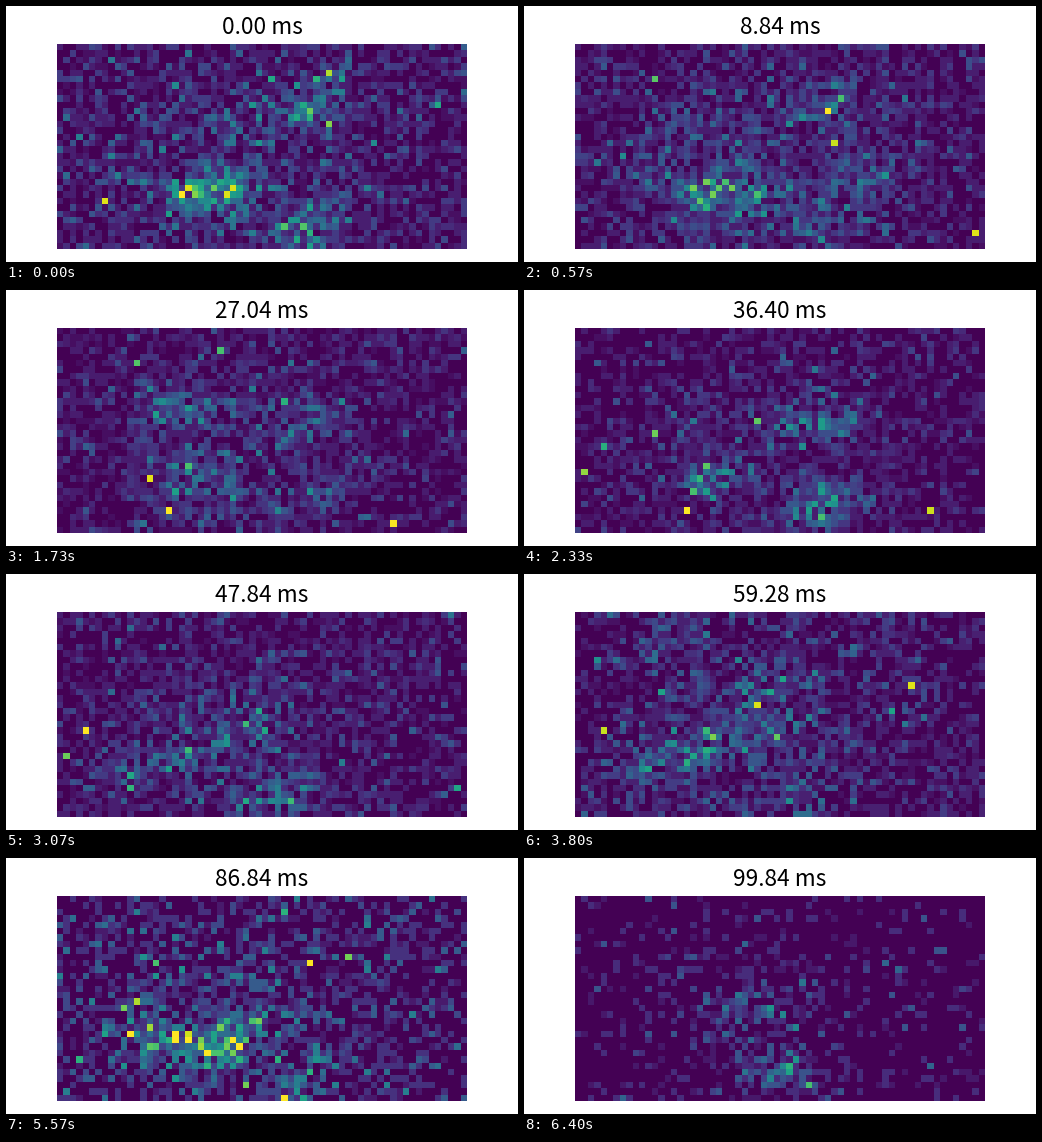
These frames come from a looping animation (512x256 px, 6.43 s). A matplotlib script:

```python
import numpy as np
import matplotlib.pyplot as plt
from matplotlib.animation import FuncAnimation

W, H, DPI = 512, 256, 100
COLS, ROWS = 64, 32
STEPS, STEP_MS = 193, 0.52
TICKS, TICK_MS = 643, 10
TOP = 7                        # count shown in the brightest colour
KERNEL = np.array([1, 1, 0.5]) # how a spike fades over the next steps
HOT_CELLS, HOT_CHANCE, HOT_STEPS = 42, 0.035, 3

rng = np.random.default_rng(11)
xx, yy = np.meshgrid(np.arange(COLS), np.arange(ROWS))

# Key moments: step, background level, spike size, centres (col, row, level)
MOMENTS = [
    (0, 0.7, 0.6, [(24, 23, 3.6), (39, 9, 1.8), (38, 28, 2.0)]),
    (34, 0.55, 0.5, [(18, 22, 1.2), (25, 27, 1.3), (16, 12, 1.0)]),
    (70, 0.42, 0.55, [(38, 14, 1.6), (38, 27, 2.2), (21, 23, 1.3)]),
    (92, 0.55, 0.6, [(34, 28, 1.8), (12, 24, 1.4), (29, 18, 1.1)]),
    (136, 0.55, 0.65, [(20, 20, 2.6), (12, 23, 1.0), (14, 4, 1.1)]),
    (167, 0.72, 1.0, [(25, 23, 3.8), (15, 21, 1.2), (37, 29, 1.4)]),
    (192, 0.17, 0.9, [(32, 27, 2.0), (27, 17, 1.1)]),
]


def blob(col, row, level, width=4.2, height=2.2, lean=0.15):
    dx = xx - col
    dy = yy - row + lean * dx
    return level * np.exp(-((dx / width) ** 2 + (dy / height) ** 2) / 2)


def field(base, centres):
    glow = 0.6 + blob(26, 17, 0.8, 15, 10)
    return base * glow + sum(blob(*c) for c in centres)


def make_rates():
    """Expected level and spike size of every step."""
    steps, bases, sizes, centres = zip(*MOMENTS)
    fields = np.array([field(b, c) for b, c in zip(bases, centres)])
    now = np.arange(STEPS)
    pos = np.interp(now, steps, np.arange(len(steps)))
    i = np.minimum(pos.astype(int), len(steps) - 2)
    u = (pos - i)[:, None, None]
    rates = (1 - u) * fields[i] + u * fields[i + 1]
    for k in now:              # a patch that wanders between the moments
        rates[k] += blob(28 + 16 * np.sin(k / 9), 18 + 9 * np.cos(k / 13),
                         0.9 * np.sin(np.pi * pos[k]) ** 2)
    return rates, np.interp(now, steps, sizes)[:, None, None]


def add_bursts(movie):
    """A few fixed cells flash brightly for some steps at a time."""
    cols = rng.integers(0, COLS, HOT_CELLS)
    rows = rng.integers(0, ROWS, HOT_CELLS)
    starts = rng.random((STEPS - 8, HOT_CELLS)) < HOT_CHANCE
    for k, cell in np.argwhere(starts):
        movie[k:k + HOT_STEPS, rows[cell], cols[cell]] += rng.uniform(4, 7)


def make_movie():
    rates, sizes = make_rates()
    gain = rng.gamma(8, 1 / 8, (ROWS, COLS))
    mean = rates * gain / sizes / KERNEL.sum()
    lag = len(KERNEL) - 1
    spikes = rng.poisson(np.concatenate([mean[:1]] * lag + [mean]))
    movie = sizes * sum(w * spikes[lag - j:lag - j + STEPS]
                        for j, w in enumerate(KERNEL))
    add_bursts(movie)
    return movie


movie = make_movie()

fig = plt.figure(figsize=(W / DPI, H / DPI), dpi=DPI, facecolor="white")
ax = fig.add_axes([0.1, 0.05, 0.8, 0.8])
ax.axis("off")
image = ax.imshow(movie[0], cmap="viridis", vmin=0, vmax=TOP,
                  interpolation="nearest", aspect="auto")
title = fig.text(0.5, 1 - 28 / H, "", ha="center", va="baseline",
                 family="Noto Sans CJK JP", size=16.3, color="black")


def update(tick):
    k = (3 * tick + 2) // 10   # 30 steps a second on a 10 ms clock
    image.set_data(movie[k])
    title.set_text(f"{k * STEP_MS:.2f} ms")
    return image, title


anim = FuncAnimation(fig, update, frames=TICKS, interval=TICK_MS,
                     repeat=True, repeat_delay=0)
plt.show()
```
